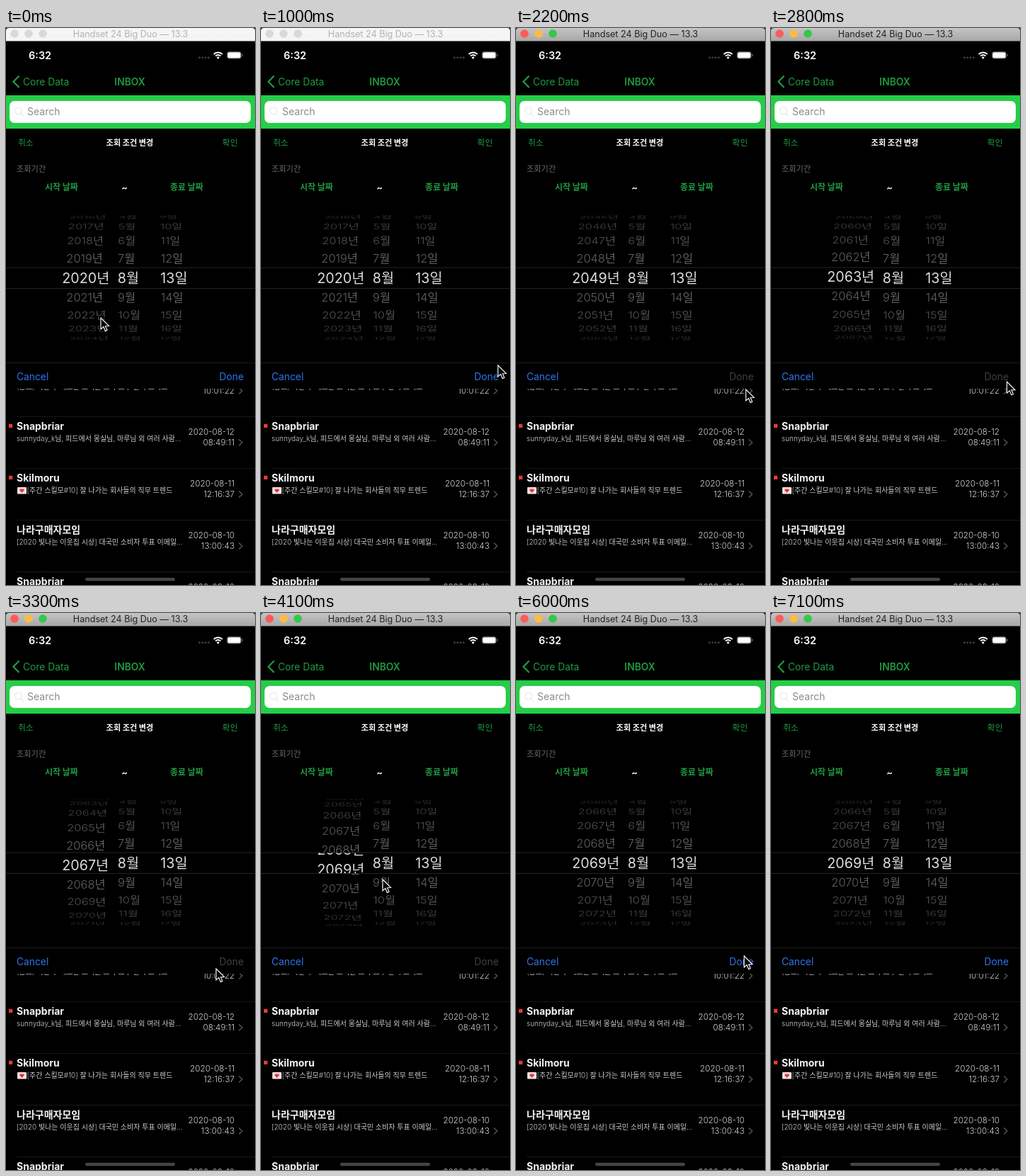
These frames come from a looping animation (352 by 786 pixels, 7.2 s). An HTML page with a canvas:

```html
<!DOCTYPE html>
<html lang="ko">
<head>
<meta charset="utf-8">
<title>Date picker</title>
<style>
html, body { margin: 0; width: 100%; height: 100%; overflow: hidden; background: #000; }
canvas { display: block; width: 352px; height: 786px; }
</style>
</head>
<body>
<canvas id="stage"></canvas>
<script>
const W = 352, H = 786, LOOP = 7200, STEP = 100;
const FONT = 'Inter, "Noto Sans CJK KR", sans-serif';
const KOREAN = '"Noto Sans CJK KR", sans-serif';
const GREEN = '#1f9a41', BLUE = '#2f74ec';

const canvas = document.getElementById('stage');
const ratio = window.devicePixelRatio || 1;
canvas.width = W * ratio;
canvas.height = H * ratio;
const ctx = canvas.getContext('2d');
ctx.scale(ratio, ratio);

function text(str, x, y, size, color, { weight = 400, align = 'left', family = FONT } = {}) {
  ctx.font = `${weight} ${size}px ${family}`;
  ctx.textAlign = align;
  ctx.fillStyle = color;
  ctx.fillText(str, x, y);
}

function rect(x, y, w, h, color, radius = 0) {
  ctx.fillStyle = color;
  ctx.beginPath();
  ctx.roundRect(x, y, w, h, radius);
  ctx.fill();
}

function disc(x, y, r, color) {
  ctx.fillStyle = color;
  ctx.beginPath();
  ctx.arc(x, y, r, 0, Math.PI * 2);
  ctx.fill();
}

function line(points, color, width) {
  ctx.strokeStyle = color;
  ctx.lineWidth = width;
  ctx.beginPath();
  points.forEach(([x, y]) => ctx.lineTo(x, y));
  ctx.stroke();
}

function clipped(x, y, w, h, draw) {
  ctx.save();
  ctx.beginPath();
  ctx.rect(x, y, w, h);
  ctx.clip();
  draw();
  ctx.restore();
}

// --- Motion ---

const FLING = { start: 1755, length: 3050, from: 2020, to: 2069, decay: 2 };

function yearAt(t) {
  const s = (t - FLING.start) / 1000, end = FLING.length / 1000;
  if (s <= 0) return FLING.from;
  if (s >= end) return FLING.to;
  const left = Math.exp(-FLING.decay * s) - Math.exp(-FLING.decay * end);
  return FLING.to - (FLING.to - FLING.from) * left;
}

// time, x, y of the pointer tip
const POINTER = [
  [0, 134, 409], [200, 190, 440], [500, 310, 507], [700, 329, 510], [900, 334, 498],
  [1000, 335, 476], [1200, 290, 470], [1500, 135, 405], [1700, 128, 400], [1800, 135, 345],
  [2000, 280, 478], [2200, 325, 510], [2400, 330, 506], [2700, 341, 500], [3000, 312, 497],
  [3300, 297, 502], [3600, 336, 495], [3800, 285, 460], [4100, 172, 376], [4400, 185, 395],
  [4800, 318, 503], [5000, 322, 506], [5700, 322, 490], [6300, 323, 478], [7000, 323, 478]
];

function pointerAt(t) {
  const i = POINTER.findIndex(key => key[0] > t);
  if (i < 0) return null;
  const [t0, x0, y0] = POINTER[i - 1], [t1, x1, y1] = POINTER[i];
  const p = (t - t0) / (t1 - t0), e = p * p * (3 - 2 * p);
  return [x0 + (x1 - x0) * e, y0 + (y1 - y0) * e];
}

// --- Window and navigation ---

function titleBar(active) {
  const bar = ctx.createLinearGradient(0, 0, 0, 18);
  bar.addColorStop(0, active ? '#c4c4c4' : '#f6f6f6');
  bar.addColorStop(1, active ? '#a8a8a8' : '#f4f4f4');
  rect(0, 0, W, 18.5, bar, [4, 4, 0, 0]);
  const lights = active ? ['#fc5b57', '#fdbc40', '#34c84a'] : ['#d9d9d9', '#d9d9d9', '#d9d9d9'];
  lights.forEach((color, i) => disc(12 + 20 * i, 8, 5.8, color));
  text('Handset 24 Big Duo — 13.3', 176, 13, 12.6, active ? '#222' : '#b2b2b2', { align: 'center' });
}

function statusBar() {
  text('6:32', 32, 43.5, 14.5, '#fff', { weight: 600 });
  for (let i = 0; i < 4; i++) rect(272 + 4.3 * i, 40.5, 3, 2.5, '#3c3c3c', 1);
  ctx.strokeStyle = '#fff';
  ctx.lineWidth = 2;
  for (const r of [5, 8.6]) {
    ctx.beginPath();
    ctx.arc(299.8, 43, r, -Math.PI * 0.75, -Math.PI * 0.25);
    ctx.stroke();
  }
  disc(299.8, 41.8, 1.6, '#fff');
  ctx.strokeStyle = '#666';
  ctx.lineWidth = 0.8;
  ctx.beginPath();
  ctx.roundRect(312.4, 33.4, 20.2, 9.8, 3);
  ctx.stroke();
  rect(313.3, 34.2, 18.4, 8.2, '#fff', 2);
  rect(333.6, 36.6, 1.2, 3.4, '#666', 0.6);
}

function navigation() {
  line([[18.5, 67.5], [10.5, 75.8], [18.5, 84]], GREEN, 2.3);
  text('Core Data', 24, 81, 13.8, GREEN);
  text('INBOX', 175, 81, 13.8, GREEN, { weight: 600, align: 'center' });
  rect(0, 95, W, 47, '#25cd48');
  rect(5, 103, 341, 31, '#fff', 7);
  ctx.strokeStyle = '#e9e9e9';
  ctx.lineWidth = 1.2;
  ctx.beginPath();
  ctx.arc(17.5, 117, 5, 0, Math.PI * 2);
  ctx.stroke();
  line([[21, 120.6], [25, 124.6]], '#e9e9e9', 1.2);
  text('Search', 30, 123, 14, '#8b8b8f');
}

function conditions() {
  const ko = { family: KOREAN }, bold = { family: KOREAN, weight: 700 };
  text('취소', 17, 166.3, 11.8, GREEN, ko);
  text('조회 조건 변경', 175, 166.3, 11.2, '#fff', { ...bold, align: 'center' });
  text('확인', 327.5, 166.3, 11.8, GREEN, { ...ko, align: 'right' });
  text('조회기간', 15, 202.5, 11.2, '#6a6a6a', ko);
  text('시작 날짜', 55, 229, 12, GREEN, bold);
  text('~', 167.5, 230, 13, '#fff', { weight: 600, align: 'center' });
  text('종료 날짜', 232, 229, 12, GREEN, bold);
}

// --- Wheel ---

const WHEEL = { middle: 352.5, radius: 90, turn: 0.3106, top: 262, bottom: 444, bandTop: 338, bandBottom: 367.5 };

function columns(year) {
  return [
    { pos: year, label: v => v + '년', x: 85, lean: 7, big: 79.3 },
    { pos: 8, label: v => ((v + 11) % 12 + 1) + '월', x: 158, lean: 2, big: 157.7 },
    { pos: 13, label: v => v + '일', x: 219, lean: -3, big: 218.3 }
  ];
}

function wheelRows(column, big) {
  const first = Math.ceil(column.pos - 5), last = Math.floor(column.pos + 5);
  for (let v = first; v <= last; v++) {
    const angle = (v - column.pos) * WHEEL.turn, flat = Math.cos(angle);
    if (flat < 0.02) continue;
    const shade = Math.round(42 + 62 * flat * flat);
    const size = big ? 19.7 : 16.4;
    ctx.save();
    ctx.translate(big ? column.big : column.x + column.lean * (1 - flat),
      WHEEL.middle + WHEEL.radius * Math.sin(angle));
    ctx.scale(1, flat);
    text(column.label(v), 0, size * 0.36, size, big ? '#dedede' : `rgb(${shade},${shade},${shade})`,
      { weight: big ? 400 : 300 });
    ctx.restore();
  }
}

function wheel(year) {
  const { top, bottom, bandTop, bandBottom } = WHEEL;
  const cols = columns(year);
  const draw = big => () => cols.forEach(c => wheelRows(c, big));
  clipped(0, top, W, bandTop - top, draw(false));
  clipped(0, bandBottom, W, bottom - bandBottom, draw(false));
  clipped(0, bandTop, W, bandBottom - bandTop, draw(true));
  rect(0, 337.8, W, 0.8, '#303030');
  rect(0, 367.2, W, 0.8, '#303030');
}

function toolbar(ready) {
  rect(0, 472, W, 0.8, '#242424');
  text('Cancel', 15, 496.5, 13.8, BLUE);
  text('Done', 336, 496.5, 13.8, ready ? BLUE : '#404040', { align: 'right' });
}

// --- Mail list ---

const MAILS = [
  { title: '', preview: '(광고) 이번 주 새로운 소식을 모아 모두 알려 드려요', date: '2020-08-12', time: '10:01:22' },
  { title: 'Snapbriar', preview: 'sunnyday_k님, 피드에서 몽실님, 마루님 외 여러 사람…', date: '2020-08-12', time: '08:49:11', unread: true },
  { title: 'Skilmoru', preview: '[주간 스킬모#10] 잘 나가는 회사들의 직무 트렌드', date: '2020-08-11', time: '12:16:37', unread: true, letter: true },
  { title: '나라구매자모임', preview: '[2020 빛나는 이웃집 시상] 대국민 소비자 투표 이메일…', date: '2020-08-10', time: '13:00:43' },
  { title: 'Snapbriar', preview: '', date: '2020-08-10', time: '' }
];

function loveLetter(x, y) {
  rect(x, y, 13, 9.5, '#f1e4e2', 1);
  line([[x + 0.5, y + 1], [x + 6.5, y + 5], [x + 12.5, y + 1]], '#cdb6b4', 0.7);
  disc(x + 5.2, y + 4, 1.8, '#ee3340');
  disc(x + 7.8, y + 4, 1.8, '#ee3340');
  ctx.beginPath();
  ctx.moveTo(x + 3.6, y + 4.8);
  ctx.lineTo(x + 9.4, y + 4.8);
  ctx.lineTo(x + 6.5, y + 8);
  ctx.fill();
}

function mailRow(mail, y) {
  rect(15, y, W - 15, 0.8, '#202020');
  if (mail.unread) rect(4, y + 10.8, 5.2, 5.2, '#ee3b30');
  text(mail.title, 15, y + 18.7, 14, '#f4f4f4', { weight: 700 });
  if (mail.letter) loveLetter(16, y + 27);
  text(mail.preview, mail.letter ? 29.5 : 15, y + 35, 10, '#cfcfcf', { weight: 300 });
  const stamp = { weight: 300, align: 'right' };
  text(mail.date, 323, y + 26, 11.7, '#d4d4d4', stamp);
  text(mail.time, 323, y + 41, 11.7, '#d4d4d4', stamp);
  line([[329.3, y + 32.5], [333.8, y + 37], [329.3, y + 41.5]], '#505050', 1.6);
}

function mailList() {
  clipped(0, 509, W, H - 509, () => MAILS.forEach((mail, i) => mailRow(mail, 475 + 73 * i)));
  rect(112, 775.8, 127, 4.4, '#454545', 2.2);
}

function pointer([x, y]) {
  ctx.beginPath();
  [[0, 0], [0, 16], [3.8, 12.6], [6.4, 18.6], [9, 17.5], [6.5, 11.7], [11.5, 11.5]]
    .forEach(([dx, dy]) => ctx.lineTo(x + dx, y + dy));
  ctx.closePath();
  ctx.fillStyle = '#000';
  ctx.fill();
  ctx.strokeStyle = '#f2f2f2';
  ctx.lineWidth = 1.2;
  ctx.stroke();
}

function frame(now) {
  const t = Math.floor(now % LOOP / STEP) * STEP;
  const spinning = t >= 1700 && t < FLING.start + FLING.length;
  rect(0, 0, W, H, '#000');
  titleBar(t >= 1700);
  statusBar();
  navigation();
  conditions();
  wheel(yearAt(t));
  toolbar(!spinning);
  mailList();
  const tip = pointerAt(t);
  if (tip) pointer(tip);
}

const startTime = performance.now();
function tick() {
  frame(performance.now() - startTime);
  requestAnimationFrame(tick);
}
tick();
</script>
</body>
</html>
```
